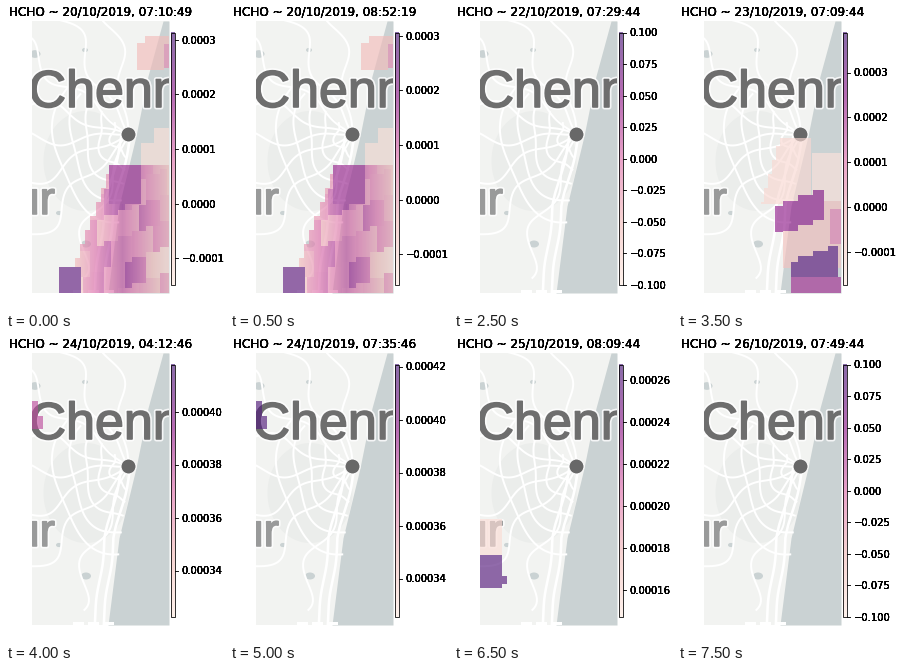
A matplotlib script that plays this animation: 218 by 304 pixels, repeating every 8 s.

```python
import numpy as np
import matplotlib.pyplot as plt
from matplotlib.animation import FuncAnimation
from matplotlib.colors import LinearSegmentedColormap
from matplotlib.patches import Circle, Ellipse, Rectangle
from matplotlib.patheffects import Normal, Stroke

W, H = 218, 304
LEFT, RIGHT, TOP, BOTTOM = 26, 163, 15, 287
BAR_X, BAR_W, BAR_TOP, BAR_END = 164.5, 4, 26.5, 279
LAND, SEA, PARK = "#f2f3f1", "#cad2d3", "#ebedeb"
CITY = (122.5, 128.5)
ORBIT = 6090  # seconds between passes
PURPLES = LinearSegmentedColormap.from_list(
    "purples", ["#feebe2", "#f3bdbb", "#dd6fab", "#8e1a8a", "#4a1c7a"])

plt.rcParams["font.family"] = "DejaVu Sans"
fig = plt.figure(figsize=(W / 72, H / 72), dpi=72, facecolor="white")
ax = fig.add_axes([0, 0, 1, 1])
ax.axis("off")

frame = Rectangle((LEFT, TOP), RIGHT - LEFT, BOTTOM - TOP, fc=LAND, lw=0)
ax.add_patch(frame)
X, Y = np.meshgrid(np.arange(LEFT, RIGHT), np.arange(TOP, BOTTOM))


# Base map

def on_map(artist):
    artist.set_clip_path(frame)
    return artist


def coast(y):
    return np.interp(y, [15, 70, 130, 200, 287], [157, 142, 130, 113, 102])


def road(x, y, width=2):
    on_map(ax.plot(x, y, color="white", lw=width, zorder=2)[0])


def blob(x, y, w, h, color):
    on_map(ax.add_patch(Ellipse((x, y), w, h, fc=color, lw=0)))


def place_name(x, y, text, size, color):
    label = ax.text(x, y, text, size=size, color=color, zorder=4, clip_on=True,
                    family="Liberation Sans", va="baseline")
    label.set_path_effects([Stroke(linewidth=5, foreground="white", alpha=0.8),
                            Stroke(linewidth=1.6, foreground=color), Normal()])
    on_map(label)


def draw_map():
    y = np.arange(TOP, BOTTOM + 1)
    blob(80, 155, 85, 100, PARK)
    on_map(ax.fill_betweenx(y, coast(y), RIGHT, color=SEA, lw=0))
    for x, ly, size in ((29, 48, 11), (80, 238, 10), (79, 44, 6), (53, 207, 6)):
        blob(x, ly, size, size * 0.7, SEA)

    # coast roads, spokes out of the centre, and ring roads
    south = y[y > CITY[1]]
    for gap in (5, 14):
        road(coast(south) - gap + np.sin(south / 11), south, 2.6)
    r = np.linspace(8, 150, 60)
    for k, angle in enumerate(np.radians(np.linspace(112, 262, 8))):
        a = angle + 0.10 * np.sin(r / 13 + 2 * k)
        road(CITY[0] + r * np.cos(a), CITY[1] + r * np.sin(a))
    a = np.radians(np.linspace(98, 215, 60))
    for k, radius in enumerate((17, 30, 44, 58, 74)):
        r = radius + 3 * np.sin(5 * a + k)
        road(CITY[0] + r * np.cos(a), CITY[1] + 1.2 * r * np.sin(a))
    for x in (69, 84, 99):
        road([x, x + 6], [286, 286], 5)

    place_name(22.5, 101, "Chennai", 52, "#6e6e6e")
    place_name(8, 208, "ur", 46, "#999a9a")
    on_map(ax.add_patch(Circle(CITY, 7.5, fc="#686868", ec="white", lw=1, zorder=4)))


# Measured fields: values from 0 to 1, NaN where nothing was measured

def blank():
    return np.full(X.shape, np.nan)


def box(x0, y0, x1, y1):
    return (X >= x0) & (X < x1) & (Y >= y0) & (Y < y1)


def tilted(step):
    """Rows that climb to the right in steps."""
    return Y + 0.36 * (X // step * step - 100)


def mosaic(k):
    noise = np.random.default_rng(5).uniform(-0.14, 0.14, (30, 30))
    row = (tilted(14) // 26).astype(int)
    col = (X + 7 * row) // 21
    grid = 0.66 - 0.009 * abs(X - 116) + noise[row, col]
    edge = 103 - 0.38 * (Y // 14 * 14 - 160)
    grid[(Y < 159) | (X < edge)] = np.nan
    grid[box(103, 159, 135, 198)] = 0.72
    grid[box(53, 261, 75, 287)] = 0.92
    grid[box(131, 37, 158, 64) | box(139, 30, 163, 54)] = 0.25
    grid[box(158, 38, 163, 62)] = 0.42
    grid[box(135, 137, 163, 159) | box(148, 122, 163, 137)] = 0.06
    return grid


def bands(k):
    grid = blank()
    rows = tilted(15)
    grid[box(83, 132, 133, 198) & (X > 100 - 0.3 * (Y // 14 * 14 - 132))] = 0.1
    grid[box(134, 147, 163, 205)] = 0.04
    grid[box(105, 195, 163, 262)] = 0.22
    grid[box(152, 203, 163, 238)] = 0.45
    grid[box(97, 180, 146, 226) & (rows > 196) & (rows < 226)] = 0.74
    grid[box(113, 238, 160, 287) & (rows > 257)] = 0.92
    grid[box(113, 271, 163, 287)] = 0.68
    return grid


def north_west(k):
    grid = blank()
    grid[box(26, 63, 32, 91) | box(26, 78, 37, 91)] = 0.97 if k == 0 else 0.6
    return grid


def south_west(k):
    grid = blank()
    grid[box(26, 181, 48, 217)] = 0.08
    grid[box(26, 217, 48, 250) | box(26, 238, 53, 246)] = 0.95 if k > -2 else 0.5
    return grid


def nothing(k):
    return blank()


# day, known pass, passes from that one, field, (top value, step, y, spacing, digits)
EMPTY = (0.1, 0.025, 26.5, 31.56, 3)
DAYS = [
    (20, (7, 10, 49), (0, 1), mosaic, (0.0003, 0.0001, 33.5, 54.7, 4)),
    (21, (6, 51, 41), (0, 1), nothing, EMPTY),
    (22, (7, 29, 44), (-1, 0), nothing, EMPTY),
    (23, (7, 9, 44), (-1, 0), bands, (0.0003, 0.0001, 66.5, 44.8, 4)),
    (24, (7, 35, 46), (-2, -1, 0), north_west, (0.00042, 0.00002, 28.5, 53, 5)),
    (25, (8, 9, 44), (-2, -1, 0), south_west, (0.00026, 0.00002, 41.5, 42, 5)),
    (26, (7, 49, 44), (-1, 0), nothing, EMPTY),
]
STEPS = [(day, clock, k, layer, scale)
         for day, clock, passes, layer, scale in DAYS for k in passes]


def heading(day, clock, k):
    h, m, s = clock
    t = h * 3600 + m * 60 + s + k * ORBIT
    return f"HCHO ~ {day}/10/2019, {t // 3600:02}:{t // 60 % 60:02}:{t % 60:02}"


def ticks(scale, k):
    value, step, y, dy, digits = scale
    if scale is not EMPTY:
        y -= 4 * abs(k)
    for i in range(9):
        if BAR_TOP <= y + i * dy <= BAR_END + 0.5:
            v = round(value - i * step, 6) + 0.0
            yield y + i * dy, f"{v:.{digits}f}".replace("-", "\u2212")


def heavy_text(x, y, size, **kw):
    """Stacked copies harden the glyph edges."""
    return [ax.text(x, y, "", size=size, color="black", **kw) for _ in range(6)]


def write(copies, text, y):
    for t in copies:
        t.set_text(text)
        t.set_y(y)


draw_map()
shade = dict(cmap=PURPLES, vmin=0, vmax=1, alpha=0.65, aspect="auto",
             interpolation="nearest")
overlay = ax.imshow(blank(), extent=(LEFT, RIGHT, BOTTOM, TOP), zorder=5, **shade)
ax.imshow(np.linspace(1, 0, 256)[:, None], zorder=5,
          extent=(BAR_X, BAR_X + BAR_W, BAR_END, BAR_TOP), **shade)
ax.add_patch(Rectangle((BAR_X, BAR_TOP), BAR_W, BAR_END - BAR_TOP, fill=False,
                       ec="black", lw=0.8, zorder=6))
ax.set_xlim(0, W)
ax.set_ylim(H, 0)

title = heavy_text(3, 9.4, 12, va="baseline")
marks = [ax.plot([], [], color="black", lw=0.9)[0] for _ in range(9)]
labels = [heavy_text(175.5, 0, 10, va="center_baseline") for _ in range(9)]


def update(i):
    day, clock, k, layer, scale = STEPS[i]
    write(title, heading(day, clock, k), 9.4)
    overlay.set_data(np.ma.masked_invalid(layer(k)))
    for mark, copies in zip(marks, labels):
        mark.set_data([], [])
        write(copies, "", 0)
    for mark, copies, (y, text) in zip(marks, labels, ticks(scale, k)):
        mark.set_data([BAR_X + BAR_W, BAR_X + BAR_W + 3.5], [y, y])
        write(copies, text, y)
    return []


anim = FuncAnimation(fig, update, frames=len(STEPS), interval=500, repeat=True,
                     repeat_delay=0, blit=False)
plt.show()
```
